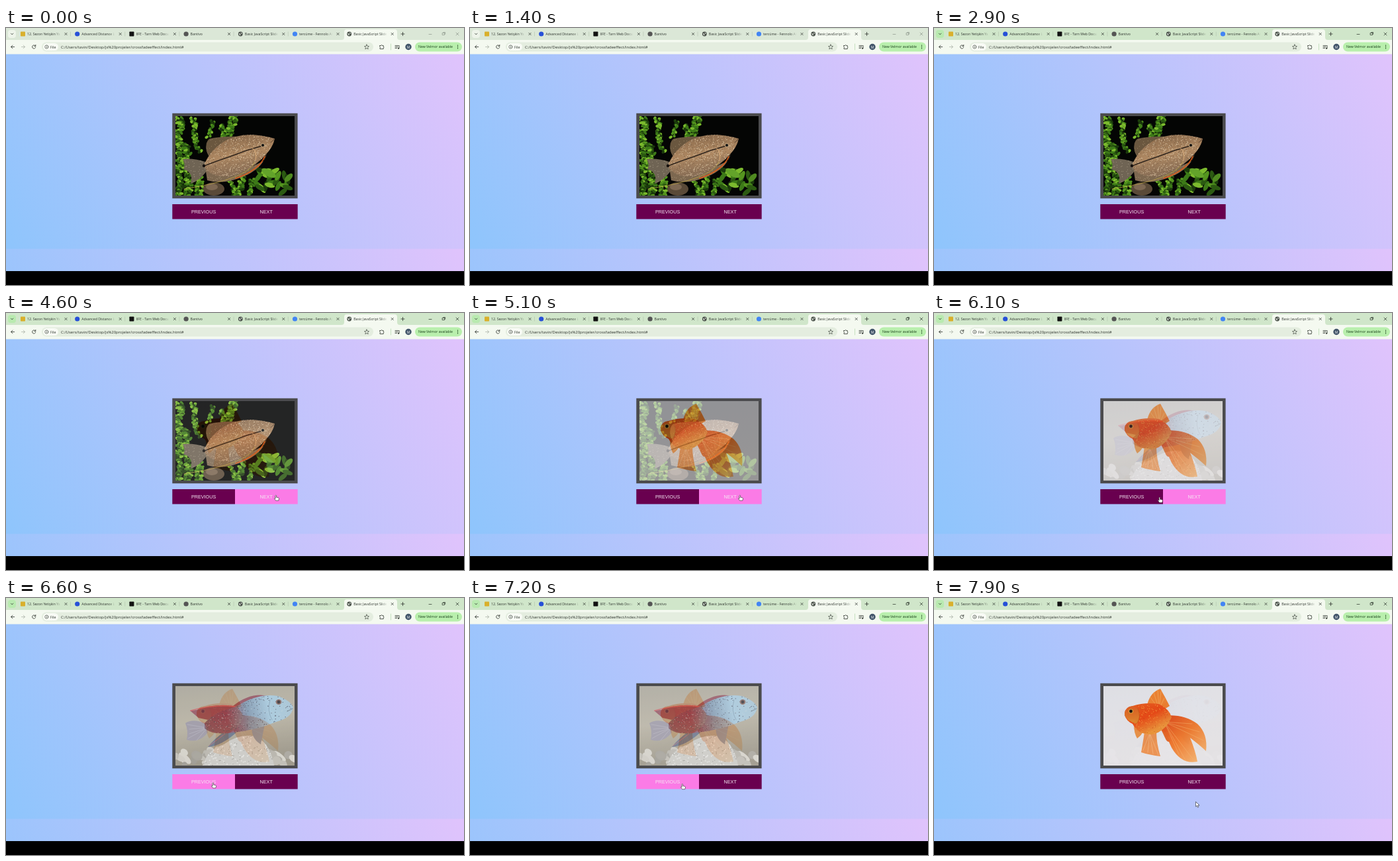
Animation of 692 by 388 pixels, one loop 8000 ms. Source, as an HTML page with a canvas:

```html
<!DOCTYPE html>
<html lang="en">
<head>
<meta charset="utf-8">
<title>Crossfade slider</title>
<style>
html, body { margin: 0; width: 100%; height: 100%; overflow: hidden; background: #000; }
canvas { display: block; }
#page {
  position: absolute; top: 39px; left: 0; width: 692px; height: 328px;
  background: linear-gradient(62deg, #8ec5fc, #e0c3fc) 0 0 / 692px 294.5px;
}
#stage { position: absolute; top: 0; left: 0; }
</style>
</head>
<body>
<div id="page"></div>
<canvas id="stage" width="692" height="388"></canvas>
<script>
const LOOP = 8000, FADE = 1000;
const UI = '"Open Sans", "Noto Sans", sans-serif';
const ARIAL = '"Liberation Sans", Arial, sans-serif';
const INK = '#2b312b';
let g;

const clamp = v => Math.max(0, Math.min(1, v));

function fill(d, color) {
  g.fillStyle = color;
  g.fill(new Path2D(d));
}
function line(d, color = INK, width = 0.8) {
  g.strokeStyle = color;
  g.lineWidth = width;
  g.lineCap = g.lineJoin = 'round';
  g.stroke(new Path2D(d));
}
function oval(x, y, rx, ry, color, turn = 0) {
  g.fillStyle = color;
  g.beginPath();
  g.ellipse(x, y, rx, ry, turn, 0, 7);
  g.fill();
}
function rect(x, y, w, h, color, r = 0) {
  g.fillStyle = color;
  g.beginPath();
  g.roundRect(x, y, w, h, r);
  g.fill();
}
function text(s, x, y, size, color = INK, family = UI, align = 'left') {
  g.font = size + 'px ' + family;
  g.textAlign = align;
  g.fillStyle = color;
  g.fillText(s, x, y);
}
function shade(x0, y0, x1, y1, ...colors) {
  const s = g.createLinearGradient(x0, y0, x1, y1);
  colors.forEach((c, i) => s.addColorStop(i / (colors.length - 1), c));
  return s;
}
function random(seed) {
  return () => (seed = (seed * 16807) % 2147483647) / 2147483647;
}
// Speckles scattered inside an outline
function speckle(d, n, color, size, seed) {
  const r = random(seed);
  g.save();
  g.clip(new Path2D(d));
  for (let i = 0; i < n; i++) {
    oval(256 + r() * 180, 133 + r() * 120, size, size * 0.8, color);
  }
  g.restore();
}
function rays(x, y, ends, color) {
  for (const [a, b] of ends) line(`M${x} ${y}L${a} ${b}`, color, 0.5);
}

// Each photo is painted once, in stage coordinates
function photo(paint) {
  const c = document.createElement('canvas');
  c.width = 180;
  c.height = 120;
  g = c.getContext('2d');
  g.translate(-256, -133);
  paint();
  return c;
}

function gourami() {
  rect(256, 133, 180, 120, '#040504');
  const r = random(91);
  const greens = ['#1b3a0c', '#2c5a12', '#3d7a18', '#55951f', '#7cba2e'];
  // Mottled leaf from one end to the other
  const leaf = (x0, y0, x1, y1, w) => {
    const n = Math.hypot(x1 - x0, y1 - y0);
    for (let i = 0; i < n; i++) {
      const u = i / n, side = (r() - 0.5) * 1.5 * w;
      const x = x0 + (x1 - x0) * u + side + Math.sin(i / 7) * 1.5;
      oval(x, y0 + (y1 - y0) * u, w * 0.5, 2, greens[r() * 5 | 0], r() * 2 - 1);
    }
  };
  leaf(263, 135, 261, 253, 7);
  leaf(272, 175, 276, 253, 7);
  leaf(282, 136, 291, 188, 5);
  leaf(312, 140, 306, 166, 4);
  leaf(343, 133, 338, 164, 7);
  leaf(325, 146, 329, 168, 5);
  leaf(290, 218, 294, 253, 7);
  leaf(338, 228, 344, 253, 5);
  leaf(356, 222, 352, 253, 6);
  leaf(372, 228, 366, 253, 5);
  for (let i = 0; i < 26; i++) {
    oval(380 + r() * 56, 214 + r() * 38, 8, 3.5, greens[r() * 5 | 0], r() * 3);
  }
  oval(397, 219, 12, 5, '#63a32a', 0.5);
  oval(427, 226, 8, 4, '#4f8a20', -0.8);
  oval(314, 243, 16, 10, '#5a4a38');
  oval(311, 240, 9, 5, '#7d6853');

  const tail = 'M304 203Q283 196 267 198Q272 207 268 213Q284 218 279 235Q294 230 305 213Z';
  fill(tail, '#6f6454');
  speckle(tail, 1100, '#b3a78f', 0.6, 7);
  const dorsal = 'M303 186Q300 172 308 167Q331 163 352 164L330 180L306 193Z';
  fill(dorsal, '#6a573f');
  speckle(dorsal, 900, '#ab9472', 0.6, 77);
  const anal = 'M301 210Q320 222 352 218L389 201L394 189Q390 208 366 221Q331 238 304 230Z';
  fill(anal, '#7d6850');
  speckle(anal, 1100, '#b9a585', 0.6, 61);
  line('M347 227Q382 215 391 194', '#dc5a17', 1.6);
  const body = 'M300 205Q309 184 330 171Q360 154 406 167Q404 179 391 193Q369 216 337 224Q311 226 300 210Z';
  fill(body, shade(340, 160, 350, 224, '#8a6a4c', '#ae8862', '#836a54'));
  speckle(body, 2200, '#d8c1a0', 0.65, 23);
  speckle(body, 1400, '#6f5843', 0.6, 52);
  line('M300 208Q318 201 330 197T363 185L387 178', '#30251d', 1.4);
  oval(299, 208, 2.2, 2.2, '#15100d');
  oval(388, 177, 3.2, 2.9, '#b89c78');
  oval(388, 177, 2.1, 2.1, '#111');
  line('M400 173L405 168', '#54402f', 0.9);
  line('M372 181Q380 187 377 200', '#d7aa77', 1);
  line('M376 202Q367 228 269 243', '#c5ad45', 0.7);
}

function goldfish() {
  rect(256, 133, 180, 120, shade(256, 133, 290, 253, '#e1e2e9', '#e8e6e9'));
  const fin = '#ed802f';
  fill('M322 161Q327 142 342 137Q350 151 356 163L343 171Z', fin);
  rays(340, 168, [[327, 150], [332, 143], [338, 139], [343, 141], [348, 151]], '#f7ba71');
  fill('M344 178Q377 174 398 190Q414 205 411 231Q399 220 387 211Q395 231 398 247Q374 252 359 226Q351 207 341 197Z',
    shade(345, 180, 403, 240, '#df4515', '#ef782c', '#f5b06c'));
  rays(348, 187, [[407, 215], [401, 202], [390, 190], [391, 243], [380, 245], [370, 236]], '#f9b56b');
  fill('M318 202Q315 223 313 233Q326 237 342 239Q336 219 336 202Z', '#ed9250');
  rays(326, 204, [[316, 230], [323, 233], [331, 235], [339, 237]], '#f8c594');
  fill('M302 190Q302 204 307 212Q314 207 316 201Z', '#e99045');
  fill('M342 196Q352 207 357 216Q353 219 350 213Z', '#e36526');
  const body = 'M288 174Q289 164 300 163Q318 157 340 160Q356 168 359 180Q350 201 330 206Q309 207 300 190Q291 186 288 177Z';
  fill(body, shade(300, 163, 320, 206, '#e5581b', '#ea4a14', '#ed9639'));
  speckle(body, 900, '#f8a23f', 0.65, 41);
  speckle(body, 450, '#bf3610', 0.5, 18);
  fill('M288 175Q289 165 300 163L309 167Q313 180 307 190Q293 187 288 177Z',
    shade(297, 163, 299, 190, '#dd5c20', '#e08a2c'));
  oval(297.5, 171, 3.6, 3.4, '#d7a13c');
  oval(297.5, 171, 2.4, 2.4, '#18120d');
  line('M308 167Q314 180 306 190', '#c64d14', 0.7);
}

function cichlid() {
  rect(256, 133, 180, 120, shade(256, 133, 270, 253, '#a4a091', '#b3ad9a', '#8f8978'));
  const r = random(67);
  for (let i = 0; i < 65; i++) {
    const tone = 140 + r() * 85 | 0;
    oval(256 + r() * 180, 230 + r() * 24, 4 + r() * 8, 3 + r() * 4, `rgb(${tone},${tone - 3},${tone - 13})`, r());
  }
  const rock = 'M297 253Q304 229 329 221Q352 204 379 209Q400 222 405 253Z';
  fill(rock, '#c8c8c2');
  speckle(rock, 650, '#e4e4e0', 1.1, 5);
  speckle(rock, 450, '#97958e', 0.8, 14);

  fill('M302 190Q283 181 271 189Q276 201 273 214Q292 220 305 203Z', '#94909e');
  rays(304, 196, [[274, 191], [277, 198], [277, 205], [275, 212], [288, 215]], '#b9b7c2');
  fill('M291 181L278 170L288 169Q316 159 343 163Q371 140 401 149L390 168L305 184Z', '#8c4554');
  line('M279 170Q316 160 346 164', '#c75a5e', 1.5);
  fill('M331 201Q314 213 305 225Q326 223 348 203Z', '#59677e');
  line('M331 205L307 223', '#a8636e', 1);
  fill('M372 193Q369 211 385 221Q388 206 391 190Z', '#85909c');
  const body = 'M300 189Q316 171 348 164Q380 143 411 148Q430 155 434 165Q432 181 408 187Q380 199 344 203Q313 208 300 197Z';
  fill(body, shade(302, 190, 430, 162, '#795061', '#803f58', '#7590aa', '#9fc6dc', '#9fc1d3'));
  speckle(body, 600, '#b9cdd8', 0.6, 9);
  speckle(body, 700, '#41495c', 0.7, 33);
  oval(412, 157, 4.4, 4, '#805e55');
  oval(412, 157, 2.4, 2.4, '#252025');
  line('M425 171L433 167', '#596c79', 0.9);
  line('M399 154Q394 170 402 184', '#7595aa', 0.8);
}

const [A, B, C] = [gourami, goldfish, cichlid].map(photo);
g = document.getElementById('stage').getContext('2d');

const tabs = [
  ['12. Sezon Yetişkin Yaz', '#d9b02c', 1],
  ['Advanced Distance Le', '#2750d8', 0],
  ['IIFE - Tarn Web Docu', '#111111', 1],
  ['Bantivo', '#555555', 0],
  ['Basic JavaScript Slider', 'globe'],
  ['tercüme - Fennolo Ara', '#4285f4', 0],
  ['Basic JavaScript Slider', 'globe']
];

function globe(x, y) {
  oval(x, y, 3.4, 3.4, '#4d544d');
  fill(`M${x - 2.4} ${y - 1}l2 .5l.5 1.5l-1 1.5ZM${x + 0.5} ${y - 2.5}l2 1.5l-1.5 1Z`, '#e9eee6');
}
function cross(x, y, s, color) {
  line(`M${x - s} ${y - s}l${2 * s} ${2 * s}M${x + s} ${y - s}l${-2 * s} ${2 * s}`, color, 0.7);
}

function tabStrip(active) {
  const strip = active ? '#d0e6ca' : '#dbe7d7';
  rect(0, 0, 692, 19, strip);
  rect(3, 3, 12, 12, active ? '#b9eab0' : '#eef4ea', 4);
  line('M7.5 8.2l1.7 1.7l1.7-1.7');
  fill('M507 18Q511 18 511 14V6Q511 2 515 2H587Q591 2 591 6V14Q591 18 595 18Z', '#f4f9f0');
  tabs.forEach(([title, icon, square], i) => {
    const x = 25.5 + i * 82.2;
    if (icon === 'globe') globe(x, 9);
    else if (square) rect(x - 3.5, 5.5, 7, 7, icon, 0.8);
    else oval(x, 9, 3.6, 3.6, icon);
    g.save();
    g.beginPath();
    g.rect(x + 6, 2, 51, 15);
    g.clip();
    text(title, x + 6.5, 11, 5.2, shade(x + 48, 0, x + 57, 0, INK, i < 6 ? strip : '#f4f9f0'));
    g.restore();
    cross(x + 65, 9, 1.7, INK);
    if (i < 5) line(`M${x + 72} 6v6`, '#a9bba5', 0.5);
  });
  line('M597 9h5M599.5 6.5v5');
  const control = active ? '#263026' : '#8b958a';
  line('M639 9.5h4M659.5 7.5h3v3h-3zM660.8 6.5h2.8v2.8', control, 0.7);
  cross(682, 9, 2, control);
}

function toolbar() {
  rect(0, 18, 692, 21.5, '#f4f9f0');
  line('M12.7 28.5h-5m2.3-2.4l-2.4 2.4l2.4 2.4');
  line('M23.5 28.5h5m-2.3-2.4l2.4 2.4l-2.4 2.4', '#abb3a9');
  line('M44.4 27A2.6 2.6 0 1 0 44.8 29M44.8 25.4v2h-2');
  rect(54, 21.5, 501, 14, '#e4eddf', 7);
  rect(56, 23, 23, 11, '#f8fbf5', 5.5);
  line('M64 28.5a2.6 2.6 0 1 1-5.2 0a2.6 2.6 0 1 1 5.2 0M61.4 28.3v1.3M61.4 27v.1', INK, 0.6);
  text('File', 67, 30.5, 5.3);
  text('C:/Users/tavin/Desktop/js%20projeler/crossfadeeffect/index.html#', 83, 30.7, 6);
  line('M545 25l1 2.3l2.5.3l-1.9 1.7l.6 2.5l-2.2-1.3l-2.2 1.3l.6-2.5l-1.9-1.7l2.5-.3Z', INK, 0.6);
  line('M565 26.5h1.8q.8-2 1.7 0h1.7v1.8q2 .8 0 1.7v1.6H565v-1.6q1.5-.9 0-1.7Z');
  line('M581.5 24v9', '#b9dab3', 0.8);
  line('M588 26.5h5M588 28.5h4M588 30.5h2.5M594 26.5v4');
  oval(593, 30.7, 1.2, 1, INK);
  oval(608, 28.5, 4.7, 4.7, '#43566a');
  text('M', 608, 30.5, 5, '#fff', UI, 'center');
  rect(618, 21.5, 71, 14, '#b9efad', 7);
  text('New Velmor available', 623, 30.4, 5.2, '#173d18');
  for (const y of [26.2, 28.5, 30.8]) oval(682.5, y, 0.7, 0.7, '#173d18');
}

// time, x, y
const path = [
  [3500, 428, 238], [3900, 409, 279], [5840, 409, 279], [6100, 342, 282],
  [6350, 306, 281], [6850, 322, 284.5], [7300, 322, 284.5], [7850, 397, 312]
];
function pointer(t) {
  if (t < path[0][0]) return null;
  const i = path.findIndex(k => k[0] > t);
  if (i < 0) return path.at(-1).slice(1);
  const [t0, x0, y0] = path[i - 1], [t1, x1, y1] = path[i];
  const u = (t - t0) / (t1 - t0), e = i === 3 ? u : u * u * (3 - 2 * u);
  return [x0 + (x1 - x0) * e, y0 + (y1 - y0) * e];
}
// 0 = previous, 1 = next, -1 = none
function hovered(t) {
  const p = pointer(t);
  if (!p || p[1] < 270 || p[1] > 292 || p[0] < 252 || p[0] > 441) return -1;
  return p[0] < 347 ? 0 : 1;
}

function cursor(t) {
  const p = pointer(t);
  if (!p) return;
  g.save();
  g.translate(...p);
  const d = hovered(t) < 0
    ? 'M-1.5-4V3L.2 1.4L1.4 4.2L2.7 3.6L1.5 1H3.7Z'
    : 'M-2-3.3Q-1.2-4.6-.4-3.3V-.8L2.4-.2Q3.6.2 3.5 1.5L2.8 4.2H-1.4L-3.7 1Q-3.4-.2-2 .8Z';
  fill(d, '#fff');
  line(d, '#252525', 0.6);
  g.restore();
}

function fadeIn(img, t, start) {
  g.globalAlpha = clamp((t - start) / FADE);
  g.drawImage(img, 256, 133);
  g.globalAlpha = 1;
}

function draw(now) {
  const t = now % LOOP;
  g.clearRect(0, 0, 692, 388);
  tabStrip(t >= 2700);
  toolbar();

  rect(251.3, 128.7, 189.3, 128.6, '#4b4b4d');
  g.drawImage(A, 256, 133);
  fadeIn(B, t, 4460);
  fadeIn(C, t, 5800);
  fadeIn(B, t, 6950);

  const over = hovered(t - 80);
  ['PREVIOUS', 'NEXT'].forEach((label, i) => {
    rect(251.3 + i * 94.7, 266, 94.7, 22.6, over === i ? '#fb7be6' : '#69004f');
    text(label, 298.6 + i * 94.6, 280, 7.2, '#f4e9f2', ARIAL, 'center');
  });
  cursor(t);
}

function tick() {
  draw(performance.now());
  requestAnimationFrame(tick);
}
tick();
</script>
</body>
</html>
```
